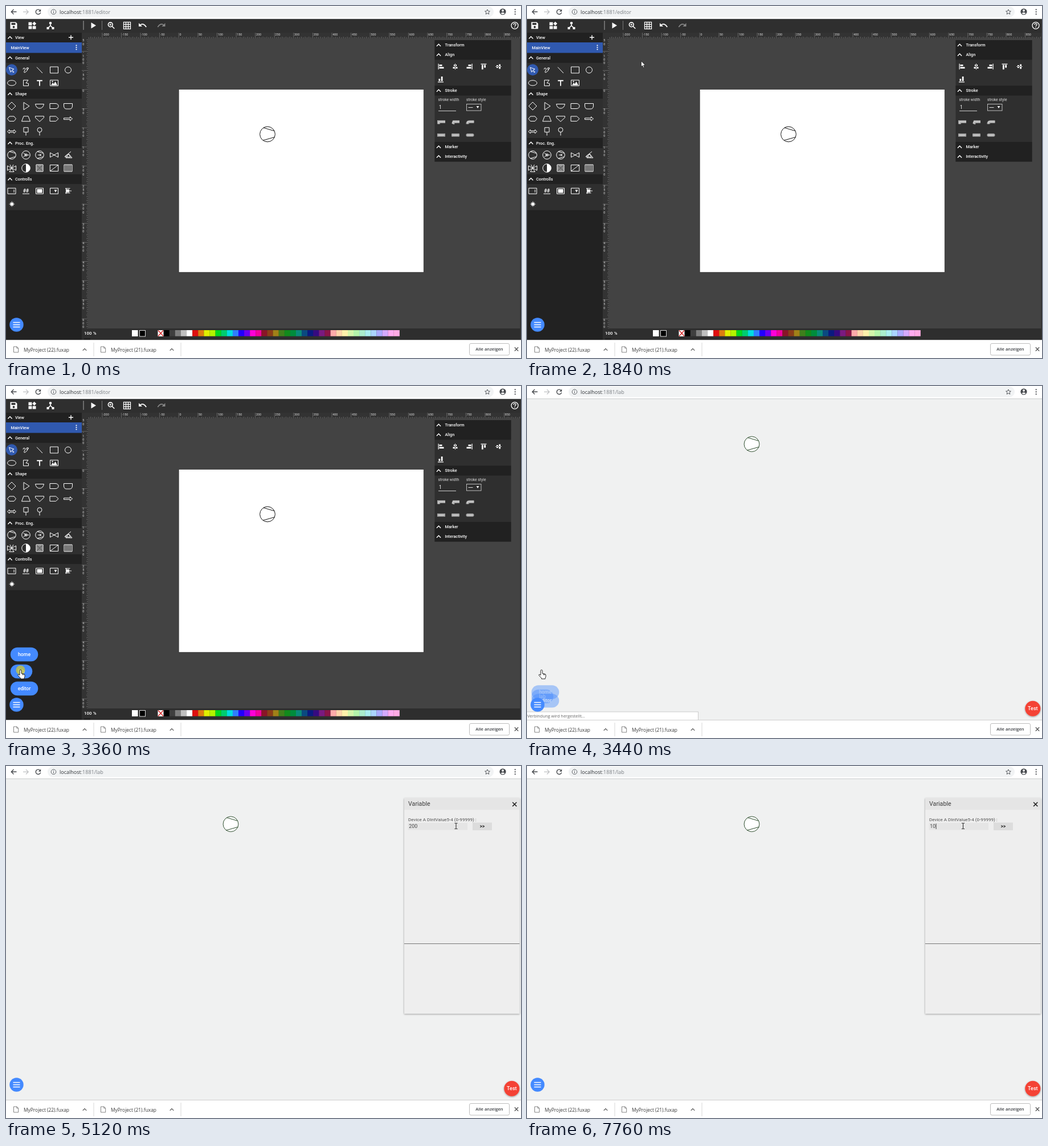
An HTML page for the animation above (8000 ms loop, 904 px wide and 619 px high).

```html
<!DOCTYPE html>
<html lang="de">
<head>
<meta charset="utf-8">
<title>Editor</title>
<style>
html, body { margin: 0; width: 100%; height: 100%; overflow: hidden; background: #fff; }
svg { display: block; }
text { font-family: Roboto, sans-serif; white-space: pre; }
.ui { font-family: "Open Sans", sans-serif; }
</style>
</head>
<body>
<svg id="stage" width="904" height="619" viewBox="0 0 904 619"></svg>
<script>
const LOOP = 8000, STEP = 80;
const stage = document.getElementById('stage');

// ---- drawing helpers, all return markup ----
const rect = (x, y, w, h, fill, more = '') =>
  `<rect x="${x}" y="${y}" width="${w}" height="${h}" fill="${fill}" ${more}/>`;
const circle = (x, y, r, fill, more = '') =>
  `<circle cx="${x}" cy="${y}" r="${r}" fill="${fill}" ${more}/>`;
const text = (x, y, s, size, fill = '#fff', weight = 400, more = '') =>
  `<text x="${x}" y="${y + size * 0.355}" font-size="${size}" fill="${fill}" font-weight="${weight}" ${more}>${s}</text>`;
const line = (x, y, d, color = '#fff', w = 1, fill = 'none') =>
  `<path transform="translate(${x} ${y})" d="${d}" fill="${fill}" stroke="${color}" stroke-width="${w}"/>`;
const solid = (x, y, d, fill = '#fff') =>
  `<path transform="translate(${x} ${y})" d="${d}" fill="${fill}" fill-rule="evenodd"/>`;
const ring = r => `M${-r} 0a${r} ${r} 0 1 0 ${2 * r} 0a${r} ${r} 0 1 0 ${-2 * r} 0z`;
const group = (id, body, more = '') => `<g id="${id}" ${more}>${body}</g>`;
const MID = 'text-anchor="middle"';

function browser() {
  let s = rect(0, 0, 904, 22, '#fff') + rect(0, 22, 904, 1, '#c9cbcc') +
    rect(73, 1, 783, 18.5, '#f1f3f4', 'rx="9"');
  s += line(13.5, 10.3, 'M5 0H-4M0-4.2L-4.2 0 0 4.2', '#45484c', 1.4);
  s += line(35, 10.3, 'M-5 0H4M0-4.2L4.2 0 0 4.2', '#bfc1c3', 1.3);
  s += line(56.5, 10.3, 'M3.2-2.7A4.2 4.2 0 1 0 4.1 1', '#45484c', 1.4) + solid(56.5, 10.3, 'M4.7-4.8V-.5H.4z', '#45484c');
  s += line(83.5, 10.3, ring(4.3) + 'M0-.6V2.5M0-2.5V-1.4', '#5f6368', 1);
  s += line(845, 10.3, 'M0-4.3L1.3-1.4 4.4-1.1 2 1 2.8 4.1 0 2.4-2.8 4.1-2 1-4.4-1.1-1.3-1.4z', '#55585c', 1);
  s += circle(872, 10, 5.6, '#45484c') + circle(872, 8, 1.9, '#fff') + solid(872, 10, 'M-3.6 2.8Q0-.2 3.6 2.8 0 6-3.6 2.8z', '#fff');
  for (const y of [6.3, 10.3, 14.3]) s += circle(893.7, y, 1.15, '#45484c');
  s += `<text class="ui" x="94" y="13.5" font-size="9" fill="#303438">localhost<tspan id="url" fill="#7b7f84"></tspan></text>`;
  return s;
}

function downloads() {
  let s = rect(0, 587, 904, 32, '#fff') + rect(0, 587, 904, 1, '#cfcfcf');
  [[0, 22], [153, 21]].forEach(([x, n]) => {
    s += line(x + 17.5, 604, 'M-4-5H1.5L4.2-2.3V5H-4zM1.3-5V-2.2H4.2', '#777', 0.9);
    s += text(x + 31, 605, `MyProject (${n}).fuxap`, 8.4, '#3b3b3b', 400, 'class="ui"');
    s += line(x + 138, 604, 'M-3.3 1.8L0-1.5 3.3 1.8', '#555', 1.2);
    s += rect(x + 153.5, 592, 1, 24, '#d8d8d8');
  });
  s += rect(813.5, 593.5, 70, 20.5, '#fff', 'rx="2.5" stroke="#bdbdbd"');
  s += text(848.5, 603.5, 'Alle anzeigen', 7.6, '#3b3e42', 600, 'class="ui" ' + MID);
  return s + line(896, 603.5, 'M-3.2-3.2L3.2 3.2M-3.2 3.2L3.2-3.2', '#555', 1.3);
}

function toolbar() {
  let s = rect(0, 22, 904, 25, '#2f2f2f') + rect(0, 22, 904, 1, '#555');
  s += solid(13.5, 34.3, 'M-6-6H3.5L6-3.5V6H-6zM-4-4.5V-1H3V-4.5zM0 .8a1.9 1.9 0 1 0 .1 0z');
  s += solid(46, 34.5, 'M-6.5-6H-.6V-.4H-6.5zM-6.5.8H-.6V6H-6.5zM.7.8H6.5V6H.7zM3.6-7L7.1-3.5 3.6 0 .1-3.5z');
  s += line(78, 34.5, 'M0-4V0L-4.8 4.6M0 0L4.8 4.6', '#fff', 1.6) + circle(78, 30, 2.3, '#fff') +
    rect(71.5, 37, 4, 4, '#fff') + rect(80.5, 37, 4, 4, '#fff');
  s += rect(135.5, 26, 1, 16, '#aaa') + rect(168, 26, 1, 16, '#777');
  s += solid(153, 34.3, 'M-3.5-5.2L5 0-3.5 5.2z');
  s += line(183.3, 32.8, ring(3.9) + 'M2.9 2.9L7 7', '#fff', 1.6) + line(183.3, 32.8, 'M-2 0H2M0-2V2');
  s += line(212.5, 34.3, 'M-6-6H6V6H-6zM-2-6V6M2-6V6M-6-2H6M-6 2H6', '#fff', 1.3);
  const undo = 'M-4.5-.5Q1-5 6.2 3';
  s += line(240, 34, undo, '#fff', 1.8) + solid(240, 34, 'M-7-4V2H-1z');
  s += line(272.5, 34, 'M4.5-.5Q-1-5-6.2 3', '#888', 1.6) + solid(272.5, 34, 'M7-4V2H1z', '#888');
  return s + line(893, 34.3, ring(6) + 'M-2-1.3Q-1.8-3.4 0-3.4 2-3.4 2-1.6 2-.6 .9.2 0 .8 0 1.8M0 2.7V4', '#fff', 1.3);
}

const chevron = (x, y) => line(x, y, 'M-3.6 1.9L0-1.7 3.6 1.9', '#fff', 1.4);
const head = (x, y, w, h, s) => rect(x, y, w, h, '#212121') + chevron(x + 7, y + h / 2) +
  text(x + (x ? 18 : 16), y + h / 2, s, 7.3, '#fff', 500);

function palette() {
  const X = [10, 35, 59, 84.5, 109];
  let s = rect(0, 47, 133, 540, '#222');
  for (const [y, h] of [[100, 46], [163, 69], [250, 46], [313, 46]]) s += rect(0, y, 133, h, '#2f2f2f');
  s += head(0, 47, 133, 17, 'View') + head(0, 82, 133, 18, 'General') + head(0, 146, 133, 17, 'Shape') +
    head(0, 232, 133, 18, 'Proc. Eng.') + head(0, 296, 133, 17, 'Controlls');
  s += line(114, 55.3, 'M-4 0H4M0-4V4', '#fff', 1.4);
  s += rect(0, 64, 133, 18.5, '#3059af') + text(8.5, 73, 'MainView', 7.3, '#fff', 500);
  for (const y of [69.3, 72.8, 76.3]) s += circle(123.5, y, 1.1, '#fff');
  s += circle(10, 112.3, 10, '#3059af');

  const row = (y, list) => list.forEach((d, i) => { if (d) s += line(X[i], y, d); });
  row(112.5, ['M-4.5-4.5L3.8-1.5.8.2 4 3.6 3 4.6-.4 1.3-1.8 3.8z',
    'M-5-1Q-5-4-2.5-3.5 0-2-2.5 1.5-4.5 4.5-2 4.5 2 3 4.5-3.5 1-5 .5-2.5 1.5 1 4.5-3.5',
    'M-5-5L5 5.5', 'M-7-5.5H7V5.5H-7z', ring(5.5)]);
  row(135.3, ['M-7.5 0a7.5 4.6 0 1 0 15 0a7.5 4.6 0 1 0-15 0z', 'M-4.5-5H4L0 0 4.5 1V5H-4.5z', '', 'M-7-5H7V5H-7z']);
  s += solid(59, 135.3, 'M-4.8-5H4.8V-3H.9V5.3H-.9V-3H-4.8z') + solid(84.5, 135.3, 'M-5.5 4L-2.5-.5-.5 2 2-2.5 5.5 4zM-4-3.5h2v2h-2z');
  row(176, ['M0-7L7 0 0 7-7 0z', 'M-4-6.5L6 0-4 6.5z', 'M-7.5-3.5H7.5Q6 4 0 4T-7.5-3.5z',
    'M-7.5-4.5H2.5Q7.5-4 7.5 0T2.5 4.5H-7.5z', 'M-7.5-4.5H7.5V0Q7 5 3 5H-3Q-7 5-7.5 0z']);
  row(198.3, ['M-4-4.3H4L7.5 0 4 4.3H-4L-7.5 0z', 'M-4-4.5H4L7.5 4.5H-7.5z', 'M-7.5-4.5H7.5V-2L0 5-7.5-2z',
    'M-7.5-4.3H3L7.5 0 3 4.3H-7.5z', 'M-7.5-1.3H3.5V-3.5L7.5 0 3.5 3.5V1.3H-7.5z']);
  row(220.8, ['M-7.5 0L-4-3.3V-1.2H4V-3.3L7.5 0 4 3.3V1.2H-4V3.3z', 'M-4-7H4V1H-4zM0 1V7', ring(4) + 'M0 4V10']);
  s = s.replace(`translate(59 220.8)`, 'translate(59 217.8)');
  const C = ring(7.3);
  row(262, [C + 'M-4-6L6.5-3M-4 6L6.5 3', C + 'M0 0L-4.5-3.5M0 0L-4.5 3.5M0 0H5.5M-2 0a2 2 0 1 0 4 0a2 2 0 1 0-4 0',
    C + 'M-4-6L6.5-3M-4 6L6.5 3M-3 0H3M0-1.5L3 0 0 1.5', 'M-7-4L7 4V-4L-7 4z', 'M1-2L7 5H-4zM-5 2L5-6M1-2L-6 3 4 4z']);
  row(285, ['M-7.5-4L0 0-7.5 4zM7.5-4L0 0 7.5 4zM0 0L-4 6.5H4zM-3-6L0 0 3-6', C, 'M-6-6H6V6H-6z', 'M-7.2-5.5H7.2V5.5H-7.2zM-7.2 5.5L7.2-5.5', 'M-7-6H7V6H-7z']);
  s += solid(35, 285, 'M0-7.3A7.3 7.3 0 0 1 0 7.3z');
  for (let i = -4.5; i < 6; i += 2.2) {
    s += line(59, 285, `M${i} -6L-6 ${i}M6 ${i}L${i} 6M-6 ${i}L${-i} 6M${-i} -6L6 ${i}`, '#ddd', 0.6);
    s += line(109, 285, `M${i} -6V6`, '#ddd', 0.8) + line(109, 285, `M-7 ${i}H7`, '#aaa', 0.35);
  }
  row(325.3, ['M-7-5H7V5H-7zM4-2.5V2.5', '', 'M-6.5-5H6.5V5H-6.5z', 'M-7-5H7V5H-7z', 'M-5-4.5H3.5M-5 3.5H3.5M-3.5-5V5']);
  s += text(35, 324.5, '##', 8.5, '#fff', 700, MID) + rect(29, 329.7, 12, 1, '#fff') + rect(54.5, 322, 9, 6.6, '#fff') +
    solid(84.5, 325.3, 'M0-2H5L2.5 2.5z') + rect(106, 322.5, 5, 5, '#fff') + rect(111, 324.6, 4, 1, '#fff');
  s += circle(10.3, 348.3, 2.8, '#fff') + line(10.3, 348.3, 'M0-4.8V4.8M-4.8 0H4.8M-3.2-3.2L3.2 3.2M-3.2 3.2L3.2-3.2', '#fff', 0.9);
  return s;
}

function rulers() {
  const K = 0.672;
  let s = rect(133, 47, 771, 10, '#333') + rect(133, 57, 11, 510, '#333'), d = '';
  for (let v = -250; v <= 890; v += 5) {
    const x = 303.3 + v * K, major = v % 50 === 0;
    if (x > 144) d += `M${x} 57v${major ? -10 : v % 10 ? -2 : -3}`;
    if (major && x > 150) s += text(x + 1.2, 50.3, v, 5.4, '#ddd');
  }
  for (let v = -130; v <= 625; v += 5) {
    const y = 147 + v * K, major = v % 50 === 0;
    if (y > 57) d += `M144 ${y}h${major ? -11 : v % 10 ? -2 : -3}`;
  }
  for (let v = -150; v <= 600; v += 50)
    [...String(v)].forEach((c, i) => {
      const y = 147 + v * K + 1.6 + i * 6.3;
      if (y > 57 && y < 566) s += text(135.7, y, c, 5.4, '#ddd', 400, MID);
    });
  return s + `<path d="${d}" stroke="#999" stroke-width=".5"/>`;
}

function colours() {
  const list = ('000 3f3f3f 7f7f7f bfbfbf fff e01010 dd7d10 e0f000 b4f400 00d820 00cc70 00dce0 2f7fff 2000ff 6a00f0 ff00d8 f0009c ' +
    '8a1428 8a3c18 a08018 3f7f1c 128a1c 008c3c 0a8a78 0a4a80 0a1a80 360a80 7a1a80 8a1448 ffaaaa ffd4aa fff0aa d4f5aa b4f4aa aaeecc ' +
    'aaeef0 aad4ff aaaaff d4aaff ffaaf0 ffaae4').split(' ');
  let s = rect(133, 567, 771, 20, '#2e2e2e') + text(137, 575, '100 %', 8, '#fff', 500);
  s += rect(221, 570, 10.5, 11, '#fff') + rect(234.5, 570.5, 10, 10.5, '#000', 'stroke="#ddd"');
  s += rect(266.5, 570, 10.2, 11, '#fff') + line(271.6, 575.5, 'M-4.5-5L4.5 5M-4.5 5L4.5-5', '#d01818', 1.2);
  list.forEach((c, i) => s += rect(276.7 + i * 10.1, 570, 10.2, 10.7, '#' + c));
  return s + rect(137, 584, 11, 3, '#222');
}

function properties() {
  const x = 752.5, w = 134;
  let s = rect(x, 60, w, 214, '#2f2f2f');
  [[60, 'Transform'], [77, 'Align'], [140, 'Stroke'], [239, 'Marker'], [256, 'Interactivity']]
    .forEach(([y, t]) => s += head(x, y, w, 17.5, t));
  const bars = (cx, cy, d) => solid(cx, cy, d);
  s += bars(763.5, 106.5, 'M-5-5h1.2V5H-5zM-3-3.5H2V-.8H-3zM-3 .8H5V3.5H-3z');
  s += bars(788.5, 106.5, 'M-.6-5H.6V5H-.6zM-2.5-3.5h5v2.7h-5zM-4 .8H4V3.5H-4z');
  s += bars(813.5, 106.5, 'M4-5H5.2V5H4zM-2-3.5H3V-.8H-2zM-5 .8H3V3.5H-5z');
  s += bars(838.5, 106.5, 'M-5-5H5v1.2H-5zM-3.5-3H-.8V5H-3.5zM.8-3H3.5V2H.8z');
  s += bars(864.5, 106.5, 'M-5-.6H5V.6H-5zM-3.5-2.5h2.7v5h-2.7zM.8-4H3.5V4H.8z');
  s += bars(763, 129, 'M-5 4H5V5.2H-5zM-3.5-1H-.8V3H-3.5zM.8-5H3.5V3H.8z');
  s += text(758.5, 164.5, 'stroke width', 6.75, '#ddd') + text(808, 164.5, 'stroke style', 6.75, '#ddd');
  s += text(760, 178, '1', 8.5) + rect(759, 184, 31, 1, '#ccc');
  s += rect(808.5, 172.5, 25.5, 11.5, 'none', 'stroke="#ccc" stroke-width=".9"') + rect(811.5, 178, 8, 1, '#ddd') + solid(828, 178, 'M-2.3-2H2.3L0 2z');
  [764, 789, 814.5].forEach((cx, i) => {
    s += line(cx, 204.5, ['M-4.5 3V-1H7', 'M-4.5 3L-3-1H7', 'M-4.5 3Q-4.5-1-1-1H7'][i], '#a8a8a8', 5);
    s += line(cx, 204.5, 'M-4.5 3V-1H7', '#eee', 0.8);
    s += rect(cx - 7, 224.3, 14, 5.4, '#a8a8a8', `rx="${[0, 1, 2.7][i]}"`) + rect(cx - 5, 226.6, 10, 0.9, '#eee');
  });
  return s;
}

const pump = (x, y, color) => line(x, y, ring(13.4), color, 1, '#fff') + line(x, y, 'M-7-11.4L12.4-5.6M-8 10.8L12.8 5', color, 1);

const editor = () => rect(133, 47, 771, 540, '#434343') + rulers() + rect(902.5, 57, 1.5, 510, '#2a2a2a') +
  rect(303.2, 146.7, 430, 321.5, '#fff', 'stroke="#222" stroke-width=".6"') + pump(459, 225.5, '#111') +
  colours() + properties() + palette() + toolbar();

function dialog() {
  let s = rect(699, 56.5, 202.5, 379, '#eee', 'filter="url(#soft)"') + rect(699, 56.5, 202.5, 20.5, '#e5e5e5');
  s += text(706, 66.5, 'Variable', 10.7, '#3c3c3c') + line(892.7, 67.3, 'M-3.6-3.6L3.6 3.6M-3.6 3.6L3.6-3.6', '#222', 1.5);
  s += text(706, 94, 'Device A DIntValue5-4 (0-99999) :', 8.05, '#505050');
  s += rect(705.5, 100, 104.5, 12.5, '#e5e5e5') + rect(819, 99.5, 34, 13.5, '#dcdcdc') + text(836, 106, '&gt;&gt;', 8.2, '#222', 700, MID);
  s += rect(699, 312, 202.5, 1, '#777');
  s += rect(707, 101, 15.5, 10.5, '#3390ff', 'id="mark"') + text(707.3, 106, '', 8.9, '#444', 400, 'id="value"') +
    rect(722, 101.3, 0.8, 9.7, '#222', 'id="caret"');
  return s + rect(705.5, 113, 105, 36.5, '#fff', 'id="hints" stroke="#c4c4c4" stroke-width=".8"');
}

const lab = () => rect(0, 23, 904, 564, '#f0f1f1') + pump(394.5, 102.2, '#2d4d2d') +
  group('status', rect(-1, 573, 301.5, 15, '#fff', 'stroke="#ccc"') + text(0.5, 580.5, 'Verbindung wird hergestellt...', 7.4, '#666', 400, 'class="ui"')) +
  group('test', circle(887.8, 567.3, 13.5, '#f44336', 'filter="url(#soft)"') + text(887.8, 566.8, 'Test', 9, '#fff', 500, MID)) +
  group('panel', dialog());

const PILLS = [['home', 472, 48.5], ['lab', 502, 38.5], ['editor', 532, 48.5]];
const pills = PILLS.map(([name, , w]) =>
  group('pill-' + name, rect(7.8, -12.2, w, 24.4, '#448aff', 'rx="12.2"') + text(7.8 + w / 2, 0, name, 8.7, '#fff', 500, MID))).join('');
const fab = group('fab', circle(0, 0, 12.2, '#448aff') + line(0, 0, 'M-6-4H6M-6 0H6M-6 4H6', '#fff', 1.3));

const HAND = 'M-1.5 9V1.2a1.5 1.5 0 0 1 3 0V6l4 .8q2 .4 2 2.2v2q0 1.5-1 3v1.5h-6.5v-1.2l-4.3-4.6q-.9-1.2 0-1.8t1.7.4z';
const pointer = group('pointer',
  group('glow', circle(0, 0, 8, '#d2c832', 'opacity=".75"')) +
  group('arrow', line(0, 0, 'M0 0V10.3L2.4 8.1 4.1 12 5.8 11.3 4.2 7.5H7.4z', '#111', 0.8, '#fff')) +
  group('hand', line(0, 0, HAND + 'M3.5 6.5V9M5.5 7V9', '#111', 0.9, '#fff')) +
  group('beam', line(0, 0, 'M-2.5-5h2l.5.5.5-.5h2M0-4.5V4.5M-2.5 5h2l.5-.5.5.5h2', '#222', 1)));

stage.innerHTML = '<defs><filter id="soft" x="-20%" y="-20%" width="140%" height="140%">' +
  '<feDropShadow dx="0" dy="1" stdDeviation="1.5" flood-color="#000" flood-opacity=".4"/></filter></defs>' +
  group('editor', editor()) + group('lab', lab()) + browser() + downloads() + pills + fab + pointer;

// ---- motion ----
const PATH = [[640, 865, 592], [960, 560, 380], [1200, 225, 150], [1360, 158, 50], [1440, 151, 30], [1680, 151, 30],
  [1920, 225, 130], [2160, 110, 430], [2320, 16, 556], [2640, 16, 556], [2960, 22, 535], [3280, 25.5, 499.5],
  [3440, 25.5, 499.5], [3680, 150, 461], [4000, 520, 500], [4240, 860, 560], [4320, 881, 566], [4720, 881, 566],
  [4880, 860, 400], [5120, 790, 105.5], [5600, 766.5, 106.5], [6400, 766.5, 106.5], [6480, 766.5, 105.5],
  [6640, 766.5, 105.5], [6720, 765.5, 105.5], [8000, 765.5, 105.5]];

const $ = id => document.getElementById(id);
const show = (id, on) => $(id).style.display = on ? '' : 'none';
const clamp = v => Math.max(0, Math.min(1, v));
const place = (id, x, y, k = 1) => $(id).setAttribute('transform', `translate(${x} ${y}) scale(${k})`);

function pointerAt(t) {
  const i = Math.max(1, PATH.findIndex(p => p[0] > t));
  const [a, b] = [PATH[i - 1], PATH[i]], k = clamp((t - a[0]) / (b[0] - a[0]));
  return [a[1] + (b[1] - a[1]) * k, a[2] + (b[2] - a[2]) * k];
}

function menuOpen(t) {
  if (t < 2640 || t >= 3600) return 0;
  if (t > 3360) return 0.25 ** ((t - 3360) / 80);
  return 1 - (1 - clamp((t - 2560) / 320)) ** 3;
}

function render(t) {
  const inLab = t >= 3440;
  show('editor', !inLab);
  show('lab', inLab);
  $('url').textContent = inLab ? ':1881/lab' : ':1881/editor';

  const [x, y] = pointerAt(t), near = (cx, cy, r) => Math.hypot(x - cx, y - cy) < r;
  const onFab = near(18.5, 560.5, 14), onTest = inLab && near(887.8, 567.3, 13.5);
  const onPill = t >= 2640 && t < 3520 && x < 46 && y < 545;
  const onPlay = !inLab && near(153, 34, 11);
  const hand = onFab || onTest || onPill || onPlay;
  const beam = inLab && x > 705 && x < 810 && y > 99 && y < 113;
  show('pointer', t >= 640);
  place('pointer', x, y);
  show('hand', hand);
  show('beam', beam);
  show('arrow', !hand && !beam);
  show('glow', [2640, 3360, 4400].some(c => t >= c && t < c + 80));

  const open = menuOpen(t);
  for (const [name, home] of PILLS) {
    const id = 'pill-' + name;
    show(id, open > 0);
    place(id, 0, 560.5 + (home - 560.5) * open);
    $(id).setAttribute('opacity', open < 1 ? Math.min(1, open * 1.7) : 1);
  }
  place('fab', 18.5, 560.5, onFab ? 1.18 : 1);

  show('status', t < 3680);
  show('panel', t >= 4400);
  $('panel').setAttribute('opacity', clamp((t - 4320) / 160));
  $('value').textContent = t < 7680 ? '200' : t < 7760 ? '1' : '10';
  const marked = t >= 5680 && t < 7680;
  show('mark', marked);
  $('value').setAttribute('fill', marked ? '#fff' : '#444');
  show('caret', t >= 5520 && !marked);
  $('caret').setAttribute('x', t < 7680 ? 722 : t < 7760 ? 712.6 : 717.7);
  show('hints', t >= 7680 && t < 7760);
}

const start = performance.now();
function tick() {
  const t = (performance.now() - start) % LOOP;
  render(Math.floor(t / STEP) * STEP);
  requestAnimationFrame(tick);
}
render(0);
requestAnimationFrame(tick);
</script>
</body>
</html>
```
